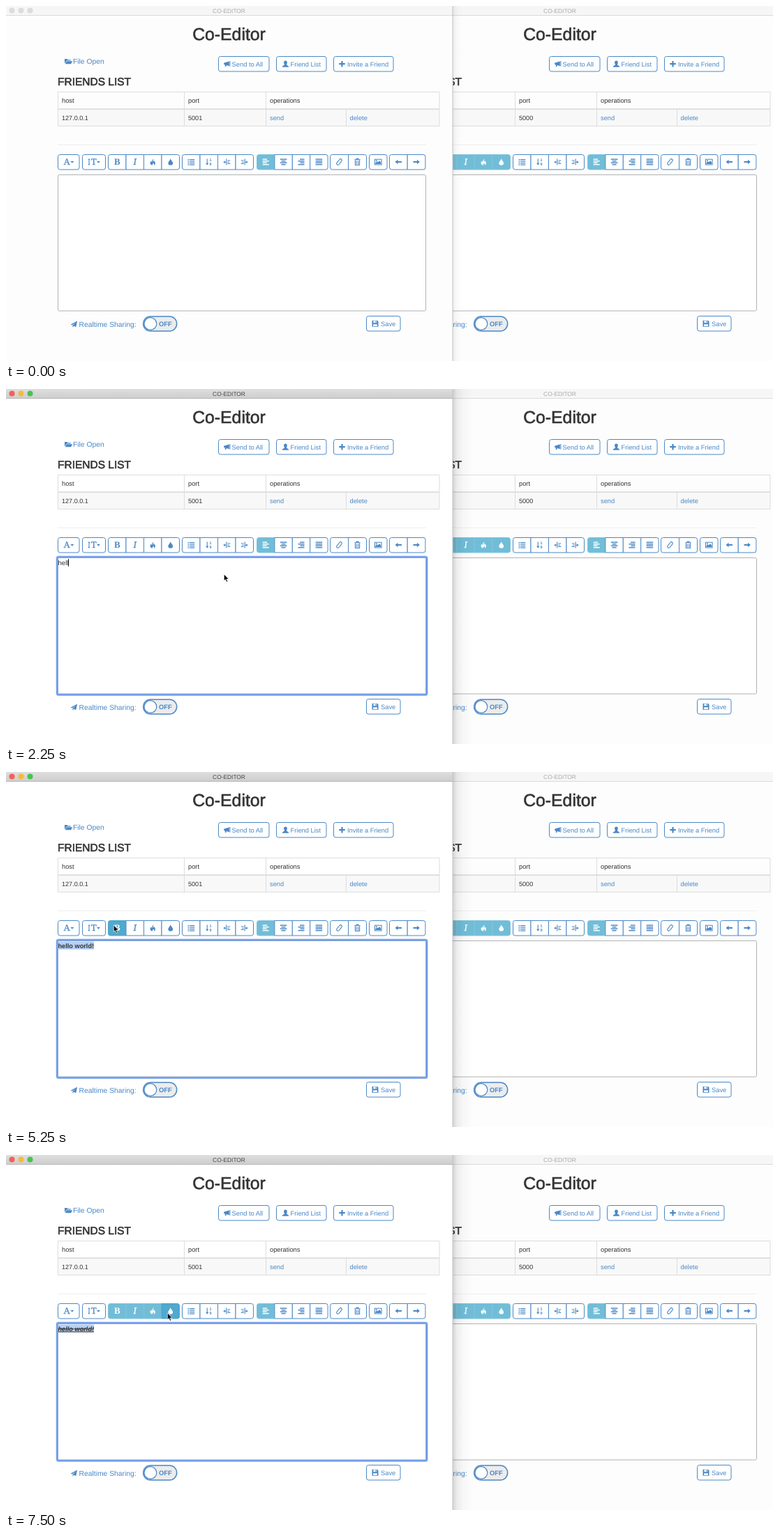
An HTML page that plays this animation: 1099x510 px, repeating every 8 s.

```html
<!DOCTYPE html>
<html lang="en">
<head>
<meta charset="utf-8">
<title>Co-Editor</title>
<style>
html, body { margin: 0; width: 100%; height: 100%; overflow: hidden; background: #fdfdfd; }
svg { display: block; width: 100%; height: 100%; }
text { font-family: "Liberation Sans", Arial, sans-serif; fill: #333; text-rendering: geometricPrecision; white-space: pre; }
.serif { font-family: "Liberation Serif", Times, serif; }
.blue, .btn { color: #4a88c7; }
.blue text, .btn text, text.blue { fill: currentColor; }
.btn rect, .btn .box { fill: #fff; stroke: currentColor; }
.icon { fill: currentColor; stroke: none; }
.icon .ln { fill: none; stroke: currentColor; stroke-width: 1.1; }
.icon .wide { stroke-width: 1.35; }
.medium { stroke: #333; stroke-width: .6; }
.btn.on { color: #fff; }
.btn.on .box { fill: #71bdd8; stroke: #80c4dc; }
.btn.hover { color: #222; }
.btn.on.hover { color: #fff; }
.btn.on.hover .box { fill: #50a9ce; stroke: #4aa3c9; }
.bar { fill: #f6f6f6; }
.barline { stroke: #dadada; }
.name { fill: #a9a9a9; }
.light { fill: #dcdcdc; }
.page { fill: #fdfdfd; }
.active .page { fill: #fff; }
.active .bar { fill: url(#bar); }
.active .barline { stroke: #b8b8b8; }
.active .name { fill: #444; }
.active .l0 { fill: #f4605a; }
.active .l1 { fill: #f5bb3c; }
.active .l2 { fill: #45c550; }
.area { fill: #fff; stroke: #b2b2b2; }
.ring { fill: none; stroke: #6c9bea; display: none; }
.focus .ring { display: inline; }
</style>
</head>
<body>
<svg id="stage" viewBox="0 0 1099 510" preserveAspectRatio="none"></svg>
<script>
const STEP = 250, LOOP = 8000;

const text = (x, y, s, size, attrs = '') => `<text x="${x}" y="${y}" font-size="${size}" ${attrs}>${s}</text>`;
const rect = (x, y, w, h, attrs = '') => `<rect x="${x}" y="${y}" width="${w}" height="${h}" ${attrs}/>`;
const line = (d, cls = '') => `<path class="ln ${cls}" d="${d}"/>`;
const fill = d => `<path d="${d}"/>`;
const put = (x, y, body) => `<g class="icon" transform="translate(${x} ${y})">${body}</g>`;
const serif = (s, x, attrs = '') => text(x, 4.4, s, 13, `class="serif" text-anchor="middle" ${attrs}`);

// Four text rows, each given as start and length.
const rows = list => line(list.map(([x, w], i) => `M${x} ${-3.8 + i * 2.5}h${w}`).join(''), 'wide');
const caretDown = x => fill(`M${x} -1h5l-2.5 2.8z`);
const outdent = line('M-.5 -4.5v9M1 -2h4M1 .2h2.5M1 2.4h4M-3 .2h2') + fill('M-5 .2l2.6 -2v4z');

const icons = {
  font: serif('A', -2.5, 'stroke="currentColor" stroke-width=".3"') + caretDown(2.6),
  size: serif('T', -.2, 'stroke="currentColor" stroke-width=".3"') + line('M-7 -4v8') + fill('M-8.5 -3l1.5 -2l1.5 2zM-8.5 3l1.5 2l1.5 -2z') + caretDown(4),
  bold: serif('B', 0, 'font-weight="bold"'),
  italic: serif('I', 0, 'font-style="italic" stroke="currentColor" stroke-width=".3"'),
  strike: fill('M.8 -5C2 -3 -.6 -1.5 .3 0C1.2 -.5 1.4 -1.5 1.3 -2.3C4 0 4.6 3 1.8 5C2.4 3 1.5 2 .6 1.4C.7 3 -1 3 -.6 5C-4 3.6 -4.4 1 -2.6 -1.2C-2.4 -.3 -2.2 .2 -1.6 .5C-2 -2 1 -3 .8 -5z'),
  under: fill('M0 -4.8C.8 -2 3.4 -.4 3.4 1.5A3.4 3.2 0 0 1 -3.4 1.5C-3.4 -.4 -.8 -2 0 -4.8z'),
  list: line('M-4.8 -3.4h2M-4.8 -.9h2M-4.8 1.6h2M-4.8 4.1h2M-2 -3.4h7M-2 -.9h7M-2 1.6h7M-2 4.1h7', 'wide'),
  order: line('M-2.5 -4.5v7') + fill('M-4.6 1.7h4.2l-2.1 3z') + text(.8, -.8, '1', 5.5, 'font-weight="bold"') + text(.8, 5, '9', 5.5, 'font-weight="bold"'),
  outdent,
  indent: `<g transform="scale(-1 1)">${outdent}</g>`,
  left: rows([[-4.5, 6.5], [-4.5, 9], [-4.5, 6], [-4.5, 9]]),
  center: rows([[-4.8, 9.6], [-3, 6], [-4.8, 9.6], [-3, 6]]),
  right: rows([[-2, 6.5], [-4.5, 9], [-1.5, 6], [-4.5, 9]]),
  justify: rows([[-4.8, 9.6], [-4.8, 9.6], [-4.8, 9.6], [-4.8, 9.6]]),
  link: `<g transform="rotate(-50)">${line('M1.2 -1.9H-3a1.9 1.9 0 0 0 0 3.8H-.8M-1.2 1.9H3a1.9 1.9 0 0 0 0 -3.8H.8')}</g>`,
  trash: line('M-4.2 -3.2h8.4M-1.5 -3.4v-1.2h3v1.2M-3.1 -2.5v7h6.2v-7M-1.2 -1.5v5M1.2 -1.5v5'),
  image: line('M-4.8 -3.8h9.6v7.8h-9.6z') + fill('M-3.8 3V1.2L-1.8 -.8L-.4 .6L1.8 -1.7L3.8 .6V3z') + '<circle cx="-2.3" cy="-1.8" r="1"/>',
  undo: fill('M-4.8 0l4 -3.2v2.2h5.4v2h-5.4v2.2z'),
  redo: fill('M4.8 0l-4 -3.2v2.2h-5.4v2h5.4v2.2z'),
  folder: fill('M-5.5 3V-3.4h3.5l1 1.2h4.2v1.3h-5.7z') + fill('M-4.8 3.8l2.2 -4.1h8.4l-2.2 4.1z'),
  horn: fill('M-4.8 -1.4L2.8 -3.8V3L-1.4 1.9V3.8H-3.2V1.4L-4.8 .9zM3.4 -4.2h1v7.8h-1z'),
  user: fill('M-4.8 4.6C-4.8 2.4 -1.4 2.4 -1.4 .9C-3.2 -1.6 -2.4 -4.6 0 -4.6S3.2 -1.6 1.4 .9C1.4 2.4 4.8 2.4 4.8 4.6z'),
  plus: fill('M-1.1 -4.3h2.2v3.2h3.2v2.2h-3.2v3.2h-2.2v-3.2h-3.2v-2.2h3.2z'),
  plane: fill('M-4.8 .6L4.6 -4.4L2.8 4L-.2 2.7L-2 4.5V1.9L2.6 -2.2L-2.8 1.4z'),
  save: '<path fill-rule="evenodd" d="M-4.5 -4.5h7.5l1.5 1.5v7.5h-9zM-2.6 -3.9v2.9h4.8v-2.9zM-2.9 1v2.7h5.8v-2.7z"/>' + fill('M.3 -3.5h1.2v2h-1.2z')
};

// Toolbar groups: left edge, button width, icons.
const groups = [
  [74.5, 30.5, 'font'],
  [109.5, 33, 'size'],
  [146.5, 25.5, 'bold italic strike under'],
  [252.5, 25.5, 'list order outdent indent'],
  [359.5, 25.4, 'left center right justify'],
  [464.5, 26, 'link trash'],
  [520.5, 25.5, 'image'],
  [549.5, 25.7, 'undo redo']
];

// Button outline rounded only at the ends of its group.
function outline(x, w, a, b) {
  const y = 213.5, h = 21.5, r = 3, p = a ? r : 0, q = b ? r : 0;
  return `M${x + p} ${y}H${x + w - q}q${q} 0 ${q} ${q}V${y + h - q}q0 ${q} ${-q} ${q}H${x + p}q${-p} 0 ${-p} ${-p}V${y + p}q0 ${-p} ${p} ${-p}z`;
}

const toolbar = on => groups.map(([x0, w, names]) => names.split(' ').map((n, i, all) => {
  const x = x0 + i * w;
  return `<g class="btn ${on.includes(n) ? 'on' : ''}" data-name="${n}">
    <path class="box" d="${outline(x, w, !i, i === all.length - 1)}"/>${put(x + w / 2, 224, icons[n])}</g>`;
}).join('')).join('');

const button = (x, y, w, icon, ix, label, tx) => `<g class="btn">${rect(x, y, w, 21.5, 'rx="3"')}
  ${put(ix, y + 10.7, icons[icon])}${text(tx, y + 14.2, label, 9.35)}</g>`;

function pane(port, on) {
  return rect(0, 0, 640, 510, 'class="page"') + rect(0, 0, 640, 13, 'class="bar"')
    + '<path class="barline" d="M0 13.5H640"/>'
    + [0, 1, 2].map(i => `<circle class="light l${i}" cx="${8.5 + i * 13}" cy="6.5" r="4"/>`).join('')
    + text(319.5, 9.8, 'CO-EDITOR', 8.4, 'class="name" text-anchor="middle"')
    + text(319.5, 48.6, 'Co-Editor', 24.8, 'class="medium" text-anchor="middle"')
    + `<g class="blue">${put(89.5, 79.5, icons.folder)}${text(96, 83.3, 'File Open', 10.3)}</g>`
    + button(304.5, 72.5, 72.5, 'horn', 317, 'Send to All', 323.5)
    + button(387.5, 72.5, 71.5, 'user', 400.5, 'Friend List', 407.5)
    + button(469.5, 72.5, 85.5, 'plus', 481.5, 'Invite a Friend', 489)
    + text(74, 114.3, 'FRIENDS LIST', 15.5, 'class="medium"')
    + rect(74.5, 148.5, 546.5, 24, 'fill="#f8f8f8"')
    + '<path fill="none" stroke="#ddd" d="M74.5 123.5H621V172.5H74.5zM74.5 148.5H621M74.5 147.7H621M255.5 123.5v49M372.5 123.5v49M487.5 148.5v24"/>'
    + text(80, 139, 'host', 9.3) + text(261, 139, 'port', 9.3) + text(378, 139, 'operations', 9.3)
    + text(80, 164, '127.0.0.1', 9.1) + text(261, 164, port, 9.1)
    + text(378, 164, 'send', 9.3, 'class="blue"') + text(492.5, 164, 'delete', 9.3, 'class="blue"')
    + '<path stroke="#eee" d="M74 199.5H602"/>'
    + toolbar(on)
    + rect(74.5, 242.5, 527, 195.5, 'class="area" rx="2"')
    + rect(73.2, 241.2, 529.8, 198, 'class="ring" rx="2" stroke-width="3.4" opacity=".5"')
    + rect(73.2, 241.2, 529.8, 198, 'class="ring" rx="2" stroke-width="2"')
    + `<g class="blue">${put(97.5, 457, icons.plane)}${text(104.5, 461, 'Realtime Sharing:', 10.35)}
       ${rect(196.7, 446, 48, 21, 'rx="10.5" fill="#ececec" stroke="currentColor" stroke-width="1.5"')}
       <circle cx="206.9" cy="456.5" r="8.9" fill="#fff" stroke="currentColor" stroke-width="1.2"/>
       ${text(219, 460, 'OFF', 9.4, 'font-weight="bold"')}</g>`
    + button(516.5, 445.5, 48.5, 'save', 529, 'Save', 537);
}

const formats = ['bold', 'italic', 'strike', 'under'];
const stage = document.getElementById('stage');
stage.innerHTML = `<defs>
  <linearGradient id="bar" x2="0" y2="1"><stop stop-color="#dedede"/><stop offset="1" stop-color="#cecece"/></linearGradient>
  <linearGradient id="shade"><stop stop-opacity=".17"/><stop offset=".2" stop-opacity=".07"/><stop offset=".5" stop-opacity=".025"/><stop offset="1" stop-opacity="0"/></linearGradient></defs>
  <g transform="translate(474 0)">${pane('5000', ['left', ...formats])}</g>
  ${rect(640, 0, 30, 510, 'id="shadow" fill="url(#shade)"')}
  <g id="front">${pane('5001', ['left'])}<path stroke="#c4c4c4" d="M640 0V510"/>
    ${rect(74.5, 243.5, 51.5, 11.5, 'id="mark" fill="#b5d0f4"')}
    ${text(74.5, 252.6, '', 9.6, 'id="typed"')}
    <path id="caret" stroke="#222" d="M0 244V255"/></g>
  <path id="arrow" fill="#000" stroke="#fff" stroke-width=".7" d="M0 0V9.6L2.1 7.7L3.8 11.3L5.4 10.6L3.8 7.1H6.9Z"/>`;

const $ = id => document.getElementById(id);
const [front, shadow, mark, typed, caret, arrow] = ['front', 'shadow', 'mark', 'typed', 'caret', 'arrow'].map($);
const show = (el, yes) => el.style.display = yes ? 'inline' : 'none';
const latest = (list, t) => list.reduce((best, item) => item[0] <= t ? item : best, [-1]);

// Time, pointer x, y, button under the pointer.
const moves = [
  [250, 312, 242], [750, 312, 266], [4750, 240, 245],
  [5000, 154, 220, 'bold'], [5500, 179, 224, 'italic'], [6000, 188, 226, 'italic'],
  [6250, 204, 226, 'strike'], [6750, 214, 227, 'strike'], [7000, 231, 227, 'under']
];
// Time, characters typed.
const typing = [[1500, 1], [1750, 2], [2000, 3], [2250, 4], [2500, 6], [2750, 7], [3000, 9], [3250, 10], [3500, 11], [4000, 12]];
const clicks = { bold: 5250, italic: 5750, strike: 6500, under: 7250 };

function draw(t) {
  const active = t >= 750, focus = t >= 1000, selected = t >= 4500;
  const [, x, y, over] = latest(moves, t);
  const on = Object.fromEntries(formats.map(f => [f, t >= clicks[f]]));

  front.classList.toggle('active', active);
  front.classList.toggle('focus', focus);
  shadow.setAttribute('width', active ? 30 : 16);
  shadow.setAttribute('opacity', active ? 1 : .5);

  for (const f of formats) {
    const btn = front.querySelector(`[data-name=${f}]`);
    btn.classList.toggle('on', on[f]);
    btn.classList.toggle('hover', over === f);
  }

  typed.textContent = 'hello world!'.slice(0, latest(typing, t)[1] || 0);
  typed.style.fontWeight = on.bold ? 'bold' : 'normal';
  typed.style.fontSize = on.bold ? '9.2px' : '9.6px';
  typed.style.fontStyle = on.italic ? 'italic' : 'normal';
  typed.style.textDecoration = [on.under && 'underline', on.strike && 'line-through'].filter(Boolean).join(' ') || 'none';

  show(mark, selected);
  mark.setAttribute('width', on.bold ? 51.5 : 48.5);
  show(caret, focus && !selected);
  caret.setAttribute('transform', `translate(${Math.floor(74.5 + typed.getComputedTextLength()) + .5} 0)`);

  show(arrow, x !== undefined);
  if (x !== undefined) arrow.setAttribute('transform', `translate(${x + .3} ${y})`);
}

const start = performance.now();
let last = -1;
function tick() {
  const t = Math.floor((performance.now() - start) % LOOP / STEP) * STEP;
  if (t !== last) draw(last = t);
  requestAnimationFrame(tick);
}
tick();
</script>
</body>
</html>
```
